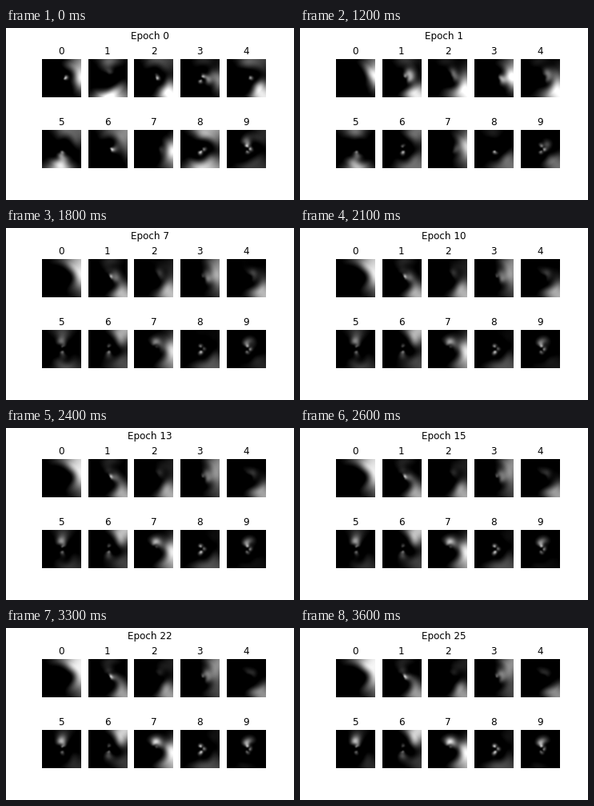
Write a matplotlib script that moves like this. It is 360x216 px and loops after 4700 ms.

```python
import numpy as np
import matplotlib.pyplot as plt
from matplotlib.animation import FuncAnimation

SIZE = 48           # samples per side
CENTER = 25, 24.5
LAST_EPOCH = 25
HOLD = 12           # frames spent on epoch 0
FRAMES = 47

COMPASS = {name: k * np.pi / 4 for k, name in
           enumerate(["E", "SE", "S", "SW", "W", "NW", "N", "NE"])}
RIM, RING, CORE = 23, 9, 3.5    # distances from the centre

rng = np.random.default_rng(4)
yy, xx = np.mgrid[0:SIZE, 0:SIZE] + 0.5
dx, dy = xx - CENTER[0], yy - CENTER[1]
DEPTH = np.log1p(np.minimum(np.hypot(dx, dy), RIM))
ANGLE = np.arctan2(dy, dx)


def glow(radius, **lights):
    """Lights on one circle: fine near the centre, broad at the rim."""
    p, q = rng.uniform(0, 2 * np.pi, 2)
    depth = DEPTH + 0.08 * np.sin(3 * ANGLE + p)
    angle = ANGLE + 0.12 * np.sin(4 * DEPTH + q)
    radial = ((depth - np.log1p(radius)) / 0.34) ** 2
    total = np.zeros((SIZE, SIZE))
    for name, strength in lights.items():
        turn = np.angle(np.exp(1j * (angle - COMPASS[name])))
        total += strength * np.exp(-0.5 * (radial + (turn / 0.42) ** 2))
    return total


def rim(**lights):
    return glow(RIM, **lights)


def ring(**lights):
    return glow(RING, **lights)


def core(**lights):
    return glow(CORE, **lights)


# Per digit: untrained, after the first epoch, after the last epoch
digits = [
    (rim(E=.85, NE=.4) + core(E=.8),
     rim(E=.9, NE=.25),
     rim(NE=.7, E=.7, N=.25, SE=.25)),
    (rim(S=1, SE=.35, N=.4) + ring(N=.25),
     rim(SE=.9, N=.25) + ring(E=.5, NE=.5) + core(NE=.5),
     rim(SE=.6, N=.15) + ring(E=.25, N=.2) + core(NE=.7, E=.5)),
    (rim(SE=1, N=.3, NE=.2) + core(E=.7, NE=.3),
     rim(SE=.9, E=.3, S=.2, N=.15) + ring(NE=.35, E=.3),
     rim(SE=.6, NE=.15) + ring(NE=.15)),
    (rim(E=.5, N=.2) + ring(E=.5) + core(NE=.7, S=.6),
     rim(E=.95, NE=.25) + ring(E=.6),
     rim(NE=.5, E=.2, SE=.25) + ring(NE=.4, E=.3) + core(NE=.4)),
    (rim(SE=.9, N=.35, NE=.2) + core(E=.6),
     rim(SE=.9, E=.25, S=.2, N=.15) + ring(NE=.4, E=.3),
     rim(SE=.55) + ring(N=.15, NE=.15)),
    (rim(S=.85, N=.35, NE=.3) + ring(S=.5) + core(S=.5),
     rim(N=.45, S=.7) + ring(S=.35) + core(S=.5),
     rim(SE=.2, N=.12) + ring(N=.7) + core(N=.5, S=.4)),
    (rim(NE=.45, E=.25, N=.25) + ring(E=.25) + core(E=.8),
     rim(NE=.45, SE=.35, S=.35) + core(S=.7, N=.4),
     rim(NE=.8, SE=.25) + ring(S=.3) + core(N=.3, S=.4)),
    (rim(E=.9, SE=.2) + ring(E=.2),
     rim(E=.75, SE=.2, NE=.15) + ring(E=.3),
     rim(E=.85, SE=.45) + ring(N=.8, NE=.3) + core(NE=.3)),
    (rim(N=.6, NE=.4, S=.7, SE=.5) + core(S=.8, E=.5),
     rim(SE=.4, S=.25, N=.15) + core(S=.7),
     rim(S=.25, SE=.25, NE=.12) + core(N=.8, S=.8, E=.5)),
    (rim(NE=.2, S=.2, SE=.2) + ring(N=.4) + core(N=.8, E=.7, S=.5),
     rim(SE=.45) + ring(NE=.3) + core(N=.5, E=.6, S=.5),
     rim(S=.12) + ring(N=.6) + core(N=.7, E=.5, S=.4)),
]


def picture(digit, epoch):
    untrained, first, last = digit
    if epoch == 0:
        field = untrained
    else:
        s = np.log(epoch) / np.log(LAST_EPOCH)
        field = (1 - s) * first + s * last
    return np.clip(1.12 * field - 0.06, 0, 1)


plt.rcParams.update({"font.family": "DejaVu Sans", "font.size": 10})
fig, axes = plt.subplots(2, 5, figsize=(5, 3), dpi=72)
fig.subplots_adjust(left=.125, right=.9, bottom=.125, top=.88,
                    wspace=.2, hspace=.2)
heading = fig.suptitle("Epoch 0", fontsize=12)

images = []
for n, (ax, digit) in enumerate(zip(axes.flat, digits)):
    images.append(ax.imshow(picture(digit, 0), cmap="gray", vmin=0, vmax=1))
    ax.set_title(str(n), fontsize=12)
    ax.axis("off")


def update(frame):
    epoch = min(max(frame - HOLD + 1, 0), LAST_EPOCH)
    heading.set_text(f"Epoch {epoch}")
    for image, digit in zip(images, digits):
        image.set_data(picture(digit, epoch))
    return [heading, *images]


anim = FuncAnimation(fig, update, frames=FRAMES, interval=100,
                     repeat=True, repeat_delay=0)
plt.show()
```
